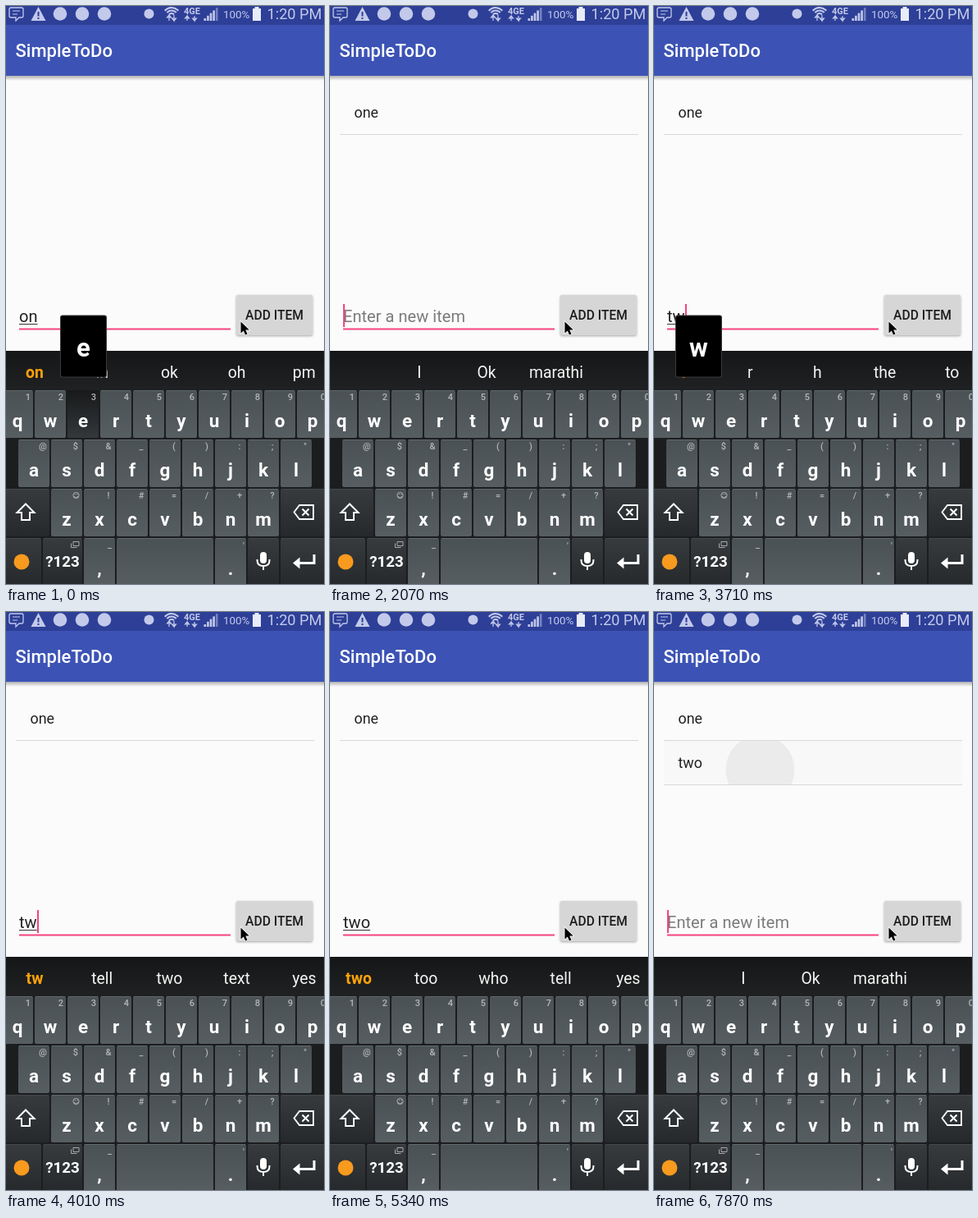
Recreate the animation shown at these times as an HTML page with a canvas. Size 388 by 704 pixels, loop 8000 ms.

```html
<!DOCTYPE html>
<html lang="en">
<head>
<meta charset="utf-8">
<title>SimpleToDo</title>
<style>
html, body { margin: 0; width: 100%; height: 100%; overflow: hidden; background: #fbfbfc; }
canvas { display: block; }
</style>
</head>
<body>
<canvas id="stage" width="388" height="704"></canvas>
<script>
const ctx = document.getElementById('stage').getContext('2d');
const LOOP = 8000;
const PINK = '#f5437f';
const ICON = '#c3c9ea';
const IDLE = [['I', 109], ['Ok', 191], ['marathi', 276]];
const ROWS = [
  { y: 468, x: -5, keys: 'qwertyuiop', hints: '1234567890' },
  { y: 528, x: 15, keys: 'asdfghjkl', hints: '@$&_():;"' },
  { y: 588, x: 55, keys: 'zxcvbnm', hints: ' !#=/+?' }
];

// Each entry changes only the properties it names.
const EVENTS = [
  [0, { text: 'on', caret: false, popup: 'e', pressed: 'e', words: 'on in ok oh pm', items: [], ripple: false }],
  [140, { text: 'one', caret: true, popup: '', pressed: '', words: 'one once done none gone' }],
  [590, { caret: false }],
  [1030, { caret: true }],
  [1180, { text: '', words: '', items: ['one'] }],
  [1620, { caret: false }],
  [2070, { caret: true }],
  [2670, { caret: false }],
  [3110, { caret: true, popup: 't', pressed: 't' }],
  [3260, { text: 't', pressed: '', words: 't r h the to' }],
  [3410, { popup: '' }],
  [3710, { text: 'tw', popup: 'w' }],
  [3860, { words: 'tw tell two text yes' }],
  [4010, { popup: '' }],
  [4300, { caret: false }],
  [4750, { text: 'two', caret: true, popup: 'o' }],
  [4900, { words: 'two too who tell yes' }],
  [5040, { popup: '' }],
  [5340, { caret: false }],
  [5780, { caret: true }],
  [5930, { text: '', words: '', items: ['one', 'two'] }],
  [6370, { caret: false }],
  [6820, { caret: true }],
  [7270, { caret: false }],
  [7720, { caret: true }],
  [7870, { ripple: true }]
];

function stateAt(time) {
  return Object.assign({}, ...EVENTS.filter(e => e[0] <= time).map(e => e[1]));
}

function rect(x, y, w, h, fill) {
  ctx.fillStyle = fill;
  ctx.fillRect(x, y, w, h);
}

function box(x, y, w, h, r, fill) {
  ctx.fillStyle = fill;
  ctx.beginPath();
  ctx.roundRect(x, y, w, h, r);
  ctx.fill();
}

function disc(x, y, r, fill) {
  ctx.fillStyle = fill;
  ctx.beginPath();
  ctx.arc(x, y, r, 0, 7);
  ctx.fill();
}

function text(str, x, y, size, color, weight = 400, align = 'left') {
  ctx.font = `${weight} ${size}px Roboto, sans-serif`;
  ctx.textAlign = align;
  ctx.fillStyle = color;
  ctx.fillText(str, x, y);
}

function shade(y, h, top, bottom) {
  const g = ctx.createLinearGradient(0, y, 0, y + h);
  g.addColorStop(0, top);
  g.addColorStop(1, bottom);
  return g;
}

function path(d, color, width) {
  const p = new Path2D(d);
  if (width) {
    ctx.strokeStyle = color;
    ctx.lineWidth = width;
    ctx.stroke(p);
  } else {
    ctx.fillStyle = color;
    ctx.fill(p);
  }
}

function statusBar() {
  rect(0, 0, 388, 23, '#2d3f97');
  path('M6 2H19Q21 2 21 4V12Q21 14 19 14H16L12 18V14H6Q4 14 4 12V4Q4 2 6 2Z', ICON, 1.3);
  path('M8 6H17M8 10H14', ICON, 1.2);
  path('M39.5 1L48.5 18H30.5Z', ICON);
  path('M39.5 7V12.5M39.5 14V16', '#2d3f97', 2);
  for (const x of [66, 93, 120]) disc(x, 9.5, 8.3, ICON);
  disc(174.5, 9.5, 6, ICON);

  ctx.lineWidth = 2;
  ctx.strokeStyle = ICON;
  for (const r of [4, 7.5, 11]) {
    ctx.beginPath();
    ctx.arc(202, 13, r, -Math.PI * 0.77, -Math.PI * 0.23);
    ctx.stroke();
  }
  path('M199 18V11L196.5 14H201.5L199 11M205 11V18L202.5 15H207.5L205 18', ICON, 1.2);
  text('4GE', 217, 10, 11, ICON, 700);
  path('M221 18V12L218.5 15H223.5L221 12M230 12V18L227.5 15H232.5L230 18', ICON, 1.2);
  for (let i = 0; i < 5; i++) {
    const h = 3 + i * 3.2;
    rect(241.5 + i * 3.6, 18 - h, 2.6, h, i < 4 ? ICON : '#7583c2');
  }
  text('100%', 265, 15, 13.4, ICON);
  rect(303.5, 1, 5, 2, '#e8ebf8');
  rect(301, 3, 10, 15, '#e8ebf8');
  text('1:20 PM', 318.5, 16, 18.2, ICON);
}

function appBar() {
  rect(0, 85, 388, 6, shade(85, 6, 'rgba(0,0,0,.3)', 'rgba(0,0,0,0)'));
  rect(0, 23, 388, 62, '#3c53b5');
  text('SimpleToDo', 11.5, 62, 22, '#fff', 500);
}

function list(s) {
  if (s.ripple) {
    rect(12, 157, 364, 53, '#f8f8f8');
    ctx.save();
    ctx.beginPath();
    ctx.rect(12, 157, 364, 53);
    ctx.clip();
    disc(129.5, 192, 42, '#ebebeb');
    ctx.restore();
  }
  s.items.forEach((item, i) => {
    text(item, 29.5, 136 + i * 54, 17.9, '#222');
    rect(12, 156 + i * 54, 364, 1, '#d9d9da');
  });
}

function entry(s) {
  text(s.text || 'Enter a new item', 16, 385, 20.1, s.text ? '#222' : '#7b7b7b');
  const width = s.text ? ctx.measureText(s.text).width : 0;
  if (s.text) rect(16, 387, width, 1, '#333');
  rect(16, 392.5, 258, 2, PINK);
  if (s.caret) rect(16 + Math.round(width), 363, 2, 28, PINK);

  ctx.save();
  ctx.shadowColor = 'rgba(0,0,0,.35)';
  ctx.shadowBlur = 3;
  ctx.shadowOffsetY = 1;
  box(281, 352, 93, 49, 2, '#d6d6d7');
  ctx.restore();
  text('ADD ITEM', 327.5, 382, 15.6, '#1c1c1c', 500, 'center');
}

function suggestions(s) {
  rect(0, 420, 388, 48, shade(420, 48, '#151617', '#202122'));
  const words = s.words ? s.words.split(' ').map((w, i) => [w, 35 + i * 82.2]) : IDLE;
  words.forEach(([word, x], i) => {
    const best = s.words && i === 0;
    text(word, x, 453, 19.4, best ? '#ffa20a' : '#f4f4f4', best ? 700 : 400, 'center');
  });
}

function key(x, y, w, dark) {
  const h = 58;
  box(x, y, w, h, 2, dark ? shade(y, h, '#373b3e', '#26292b') : shade(y, h, '#4a5155', '#575e62'));
  rect(x + 1, y, w - 2, 1, dark ? '#43484b' : '#62696d');
}

function hint(str, x, y) {
  text(str, x, y, 11, '#b3b7b9', 500, 'center');
}

function letterRows(s) {
  for (const row of ROWS) {
    [...row.keys].forEach((ch, i) => {
      const x = row.x + i * 40;
      if (ch === s.pressed) box(x, row.y, 38, 58, 2, shade(row.y, 58, '#17191a', '#34383b'));
      else key(x, row.y, 38);
      text(ch, x + 19, row.y + 44.5, 22.5, '#fff', 700, 'center');
      hint(row.hints[i], x + (row.y === 468 ? 32 : 30), row.y + 12);
    });
  }
  ctx.strokeStyle = '#b3b7b9';
  ctx.lineWidth = 0.9;
  ctx.beginPath();
  ctx.arc(85.5, 596, 3.6, 0, 7);
  ctx.moveTo(87.5, 597);
  ctx.arc(85.5, 597, 2, 0, Math.PI);
  ctx.stroke();
  rect(84, 594, 1, 1, '#b3b7b9');
  rect(86.5, 594, 1, 1, '#b3b7b9');
}

function functionKeys() {
  key(-2, 588, 55, true);
  key(335, 588, 55, true);
  path('M24 606.5L34.5 617H29V626H19V617H13.5Z', '#fff', 2);
  path('M358 608H375V625H358L351.5 616.5Z', '#fff', 1.8);
  path('M361.5 612.5L369.5 620.5M369.5 612.5L361.5 620.5', '#fff', 2);

  key(-2, 648, 45, true);
  key(45, 648, 48, true);
  key(95, 648, 38);
  key(135, 648, 118);
  key(255, 648, 38);
  key(295, 648, 38, true);
  key(335, 648, 55, true);
  disc(19, 677, 9.5, '#f79a1e');
  text('?123', 69, 683, 18.8, '#fff', 700, 'center');
  path('M82 652.5H89V657.5H82ZM79.5 654.5V659.5H86.5', '#a5a9ab', 1);
  text(',', 114, 693, 22.5, '#fff', 700, 'center');
  text('.', 274, 693, 22.5, '#fff', 700, 'center');
  rect(124, 660, 5, 1, '#b3b7b9');
  hint("'", 290, 661);

  box(310, 665, 8, 14, 4, '#fff');
  path('M306.5 674V675Q306.5 682 314 682Q321.5 682 321.5 675V674M314 682V687', '#fff', 2);
  path('M376 668V678.5H355', '#fff', 3);
  path('M350 678.5L358.5 671.5V685.5Z', '#fff');
}

function popup(ch) {
  const x = -14 + ROWS[0].keys.indexOf(ch) * 40;
  box(x, 376.5, 57, 76, 3, '#3a3a3a');
  box(x + 1, 377.5, 55, 74, 2, '#000');
  text(ch, x + 28.5, 427, 31, '#fff', 700, 'center');
}

function pointer() {
  const shape = 'M286.5 384.5V398.5L289.8 395.5L292 400.5L294.5 399.4L292.3 394.6H296.8Z';
  path(shape, '#fff', 1.4);
  path(shape, '#000');
}

function draw(now) {
  const s = stateAt(now % LOOP);
  rect(0, 0, 388, 704, '#fbfbfc');
  list(s);
  appBar();
  statusBar();
  entry(s);
  rect(0, 420, 388, 284, '#1b1d1f');
  suggestions(s);
  letterRows(s);
  functionKeys();
  if (s.popup) popup(s.popup);
  pointer();
}

const start = performance.now();
function tick() {
  draw(performance.now() - start);
  requestAnimationFrame(tick);
}
tick();
</script>
</body>
</html>
```
